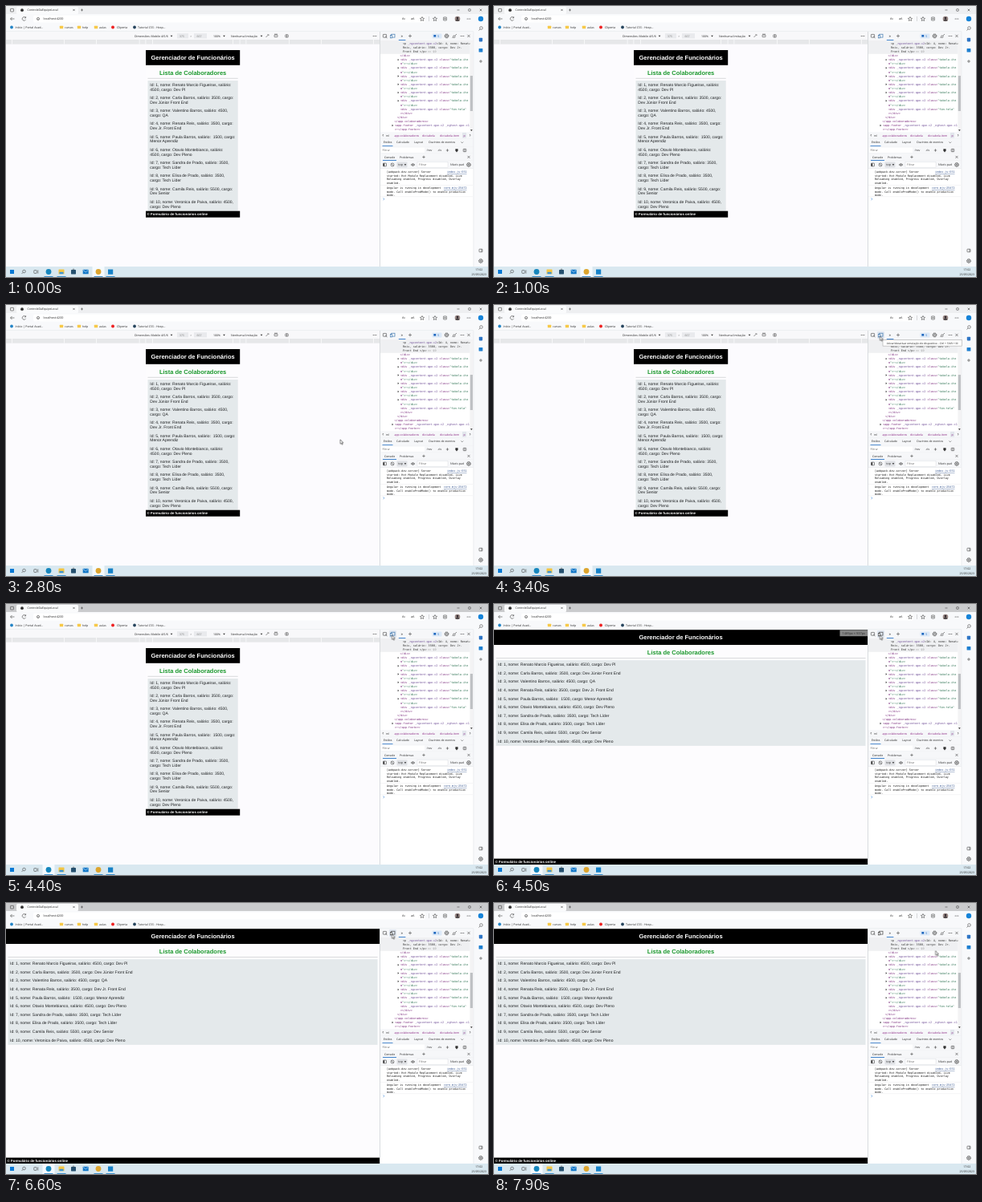
An HTML page for the animation above (8 s loop, 600x338 px).

```html
<!DOCTYPE html>
<html lang="pt-BR">
<head>
<meta charset="utf-8">
<title>Lista de Colaboradores</title>
<style>
html, body { margin: 0; width: 100%; height: 100%; overflow: hidden; background: #fff; }
svg { display: block; width: 100vw; height: 100vh; }
text { font-family: "Open Sans", "Noto Sans", sans-serif; text-rendering: geometricPrecision; white-space: pre; }
.page text { font-family: "Liberation Sans", Arial, sans-serif; }
.mono text { font-family: "DejaVu Sans Mono", "Liberation Mono", monospace; }
.attr { fill: #6c4a94; }
.val { fill: #2a7050; }
.b { font-weight: 700; }
.line { fill: none; stroke: #444; stroke-width: .6; }
.phone, .desk, .size, .tip, .blurred, .focused, .hover, .cursor { animation: 8s step-end infinite; }
.phone { animation-name: phone; }
.desk { animation-name: desk; }
.size { animation-name: size; }
.tip { animation-name: tip; }
.blurred { animation-name: blurred; }
.focused { animation-name: focused; }
.hover { animation-name: hover; }
.cursor { animation-name: cursor; }
@keyframes phone { 0% { opacity: 1; } 56.25%, 100% { opacity: 0; } }
@keyframes desk { 0% { opacity: 0; } 56.25%, 100% { opacity: 1; } }
@keyframes size { 0% { opacity: 0; } 56.25% { opacity: 1; } 65%, 100% { opacity: 0; } }
@keyframes tip { 0% { opacity: 0; } 42.5% { opacity: 1; } 53.75%, 100% { opacity: 0; } }
@keyframes blurred { 0% { opacity: 1; } 53.75%, 100% { opacity: 0; } }
@keyframes focused { 0% { opacity: 0; } 53.75%, 100% { opacity: 1; } }
@keyframes hover { 0% { opacity: 0; } 41.25% { opacity: 1; } 98.75%, 100% { opacity: 0; } }
@keyframes cursor {
  0% { opacity: 0; transform: translate(400px, 200px); }
  35% { opacity: 1; transform: translate(400px, 200px); animation-timing-function: steps(5, start); }
  41.25% { opacity: 1; transform: translate(480.4px, 38.8px); }
  98.75%, 100% { opacity: 1; transform: translate(549.6px, 59.6px); }
}
</style>
</head>
<body>
<svg id="stage" viewBox="0 0 600 338" preserveAspectRatio="none"></svg>
<script>
const esc = s => s.replace(/&/g, '&amp;').replace(/</g, '&lt;').replace(/>/g, '&gt;');
const rect = (x, y, w, h, fill, more = '') => `<rect x="${x}" y="${y}" width="${w}" height="${h}" fill="${fill}" ${more}/>`;
const dot = (x, y, r, fill, more = '') => `<circle cx="${x}" cy="${y}" r="${r}" fill="${fill}" ${more}/>`;
const path = (d, more = '') => `<path class="line" d="${d}" ${more}/>`;
const text = (x, y, s, size = 3.5, fill = '#222', more = '') =>
  `<text x="${x}" y="${y}" font-size="${size}" fill="${fill}" ${more}>${esc(s)}</text>`;
const mid = (x, y, s, size, fill, more = '') => text(x, y, s, size, fill, `text-anchor="middle" ${more}`);
const group = (name, ...parts) => `<g class="${name}">${parts.join('')}</g>`;

// Small interface icons
const ring = (x, y, r = 2) => dot(x, y, r, 'none', 'class="line"');
const gear = (x, y) => ring(x, y, 2.1) + ring(x, y, .8) +
  dot(x, y, 2.5, 'none', 'stroke="#444" stroke-width=".7" stroke-dasharray="1 .96"');
const cross = (x, y, r = 1.6) => path(`M${x - r} ${y - r}l${2 * r} ${2 * r}m0 ${-2 * r}l${-2 * r} ${2 * r}`);
const plus = (x, y, r = 2) => path(`M${x - r} ${y}h${2 * r}M${x} ${y - r}v${2 * r}`);
const caret = (x, y) => `<path d="M${x - 1.3} ${y - .7}h2.6l-1.3 1.8z" fill="#222"/>`;
const dots = (x, y) => [-1.8, 0, 1.8].map(d => dot(x + d, y, .5, '#333')).join('');
const box = (x, y, w, h) => rect(x - w / 2, y - h / 2, w, h, 'none', 'class="line" rx=".5"');
const lens = (x, y) => ring(x + .5, y - .5, 1.8) + path(`M${x - .8} ${y + .8}l-1.7 1.7`);
const eye = (x, y) => path(`M${x - 2.5} ${y}q2.5 -3 5 0q-2.5 3 -5 0`) + dot(x, y, .8, '#444');
const star = (x, y) => path(`M${x} ${y - 2.5}l.8 1.7 1.8.2-1.3 1.3.3 1.8-1.6-.9-1.6.9.3-1.8-1.3-1.3 1.8-.2z`);

function browser() {
  const folder = (x, label) => rect(x - 2.2, 24.7, 4.4, 3.6, '#f7c948', 'rx=".5"') + text(x + 4, 28.1, label, 3.5);
  return group('browser',
    rect(0, 0, 600, 10, '#eeeff1'), group('focused', rect(0, 0, 600, 10, '#cacbcd')),
    rect(13, 1, 77, 9, '#fafbfc', 'rx="1.5"'),
    box(7.5, 5.2, 4, 3.6), dot(20, 5.2, 1.9, '#333'),
    text(26.5, 6.4, 'ControleDaEquipeLocal', 3.5), cross(84.5, 5, 1.1), plus(94.5, 5, 1.5),
    path('M561.5 5h3'), box(577, 5, 2.6, 2.6), cross(591, 5, 1.3),
    rect(0, 10, 600, 22, '#f8f9fb'), rect(34, 11.8, 488, 8.6, '#fff', 'rx="2"'),
    path('M10.5 16h-5l2-2m-2 2l2 2'), path('M24.4 14.6a2.3 2.3 0 1 0 .2 2.3M24.6 13.2v1.7h-1.7'),
    ring(40, 16, 1.6), path('M40 15.7v1.3'), text(46.5, 17.3, 'localhost:4200', 3.7),
    text(493, 17.3, 'A»', 3.7), text(504, 17.3, 'aA', 3.7), star(518, 16), star(534, 16),
    box(546.5, 16, 4, 4), plus(546.5, 16, 1), path('M526.5 13v6', 'opacity=".3"'),
    dot(562, 16, 3.3, '#9b8a86'), dot(562, 15, 1.3, '#342b30'), path('M559.8 18.2q2.2-3.4 4.4 0z', 'style="fill:#342b30"'),
    dots(576, 16), dot(591, 16, 3.2, '#1683d8'),
    dot(7, 26.5, 1.9, '#2384c6'), text(11.5, 28.1, 'Início | Portal Acad...', 3.6),
    folder(69, 'cursos'), folder(91, 'help'), folder(112, 'aulas'),
    dot(133, 26.5, 2, '#e22'), text(138, 28.1, 'Cliperia', 3.7),
    dot(160, 26.5, 1.9, '#27455e'), text(164, 28.1, 'Tutorial CSS - Hosp...', 3.6),
    rect(0, 31.6, 582, .5, '#dde0e4'));
}

function sidebar() {
  return group('sidebar', rect(582, 22, 18, 303, '#f8f9fb'), rect(581.7, 32, .5, 293, '#dcdfe3'),
    lens(591, 28), rect(588.8, 39.8, 4.4, 4.6, '#2e75c5', 'rx=".8"'), rect(588.6, 53, 4.8, 4.4, '#1d7fd0', 'rx=".5"'),
    plus(591, 69), box(591, 305, 4, 3.6), path('M592 303.2v3.6'), gear(591, 318));
}

function taskbar() {
  const active = (name, x) => group(name, rect(x - 7.5, 325, 15, 13, '#f5fafe'));
  return group('taskbar', rect(0, 325, 600, 13, '#d9e8f0'),
    active('blurred', 115), active('focused', 53),
    rect(5, 329, 5, 5, '#0878d4'), lens(22, 331.5),
    box(36.5, 331.5, 3.4, 3.8), path('M39.8 329.4v4.2'),
    dot(53, 331.5, 3.4, '#1686bd'),
    rect(65.5, 328.6, 7, 5.6, '#f4c542', 'rx=".5"'), rect(66.5, 331.8, 5, 2.4, '#3b93d6'),
    rect(81, 329, 6, 5.4, '#25506f', 'rx=".6"'), path('M82.6 329q1.4-2.4 2.8 0'),
    rect(95.7, 328.8, 7, 5.4, '#1478c8', 'rx=".5"'), path('M95.9 329.2l3.3 2.8 3.3-2.8', 'style="stroke:#d7ebff"'),
    dot(115, 331.5, 3.4, '#dda52f'), rect(127, 328.5, 6.2, 6.2, '#1681c7'),
    [53, 69, 115, 130].map(x => rect(x - 5.5, 337.2, 11, .8, '#1a7bc4')).join(''),
    mid(588.8, 329.9, '17:02', 3.5, '#222'), mid(588.8, 335.9, '25/05/2023', 3.5, '#222'));
}

// name, salary, role, and the words that stay on the first phone line
const staff = [
  ['Renato Marcio Figueiras', ' 4500', 'Dev Pl', 'salário:'],
  ['Carla Barros', ' 3500', 'Dev Júnior Front End', 'cargo:'],
  ['Valentino Barros', ' 4500', 'QA', '4500,'],
  ['Renata Reis', ' 3500', 'Dev Jr. Front End', 'cargo:'],
  ['Paula Barros', '  1500', 'Menor Aprendiz', 'cargo:'],
  ['Otavio Montebianco', ' 4500', 'Dev Pleno', 'salário:'],
  ['Sandra de Prado', ' 3500', 'Tech Líder', '3500,'],
  ['Elisa de Prado', ' 3500', 'Tech Líder', '3500,'],
  ['Camila Reis', ' 5500', 'Dev Senior', 'cargo:'],
  ['Veronica de Paiva', ' 4500', 'Dev Pleno', '4500,']
].map(([name, pay, role, stop], i) => {
  const all = `Id: ${i + 1}, nome: ${name}, salário:${pay}, cargo: ${role}`;
  const cut = all.indexOf(stop) + stop.length;
  return { all, lines: [all.slice(0, cut), all.slice(cut).trim()] };
});

// Shared layout of the page: left edge, top, width, list height, footer top
function page(x, y, w, list, foot, items) {
  const c = x + w / 2;
  return group('page',
    rect(x, y, w, foot + 8 - y, '#fdfcfe'), rect(x, y, w, 18.8, '#000'),
    mid(c, y + 12.1, 'Gerenciador de Funcionários', 7.5, '#fff', 'class="b"'),
    mid(c, y + 30.8, 'Lista de Colaboradores', 7.5, '#1a982c', 'class="b"'),
    rect(x + 2.5, y + 34.9, w - 5, .5, '#b4b6b9'),
    rect(x + 2.5, y + 38, w - 5, list, '#e4e9eb'), items,
    rect(x, foot, w, 8, '#000'),
    text(x + 1.6, foot + 5.6, '© Formulário de funcionários online', 4.4, '#fff', 'class="b"'));
}

function phone() {
  const rows = staff.map(({ lines }, i) =>
    lines.map((s, k) => text(179.3, 99.8 + i * 16.22 + k * 5.75, s, 5, '#1d1f21')).join('')).join('');
  const marks = [320, 375, 425, 768, 1024, 1440].flatMap(v => [-1, 1].map(s => 232.5 + s * v * .15625));
  return group('phone', rect(0, 32, 465, 293, '#fcfbfe'), rect(0, 32, 465, 10, '#f8f8fa'),
    text(160, 38.7, 'Dimensões: Mobile 4/5/6', 3.6), caret(206, 37.4),
    rect(213, 34.2, 14, 6.2, '#e9eaed'), mid(219, 38.7, '375', 3.4, '#777'),
    mid(230.2, 38.7, '×', 3.4, '#777'), rect(234, 34.2, 16, 6.2, '#e9eaed'), mid(240.5, 38.7, '667', 3.4, '#777'),
    text(258, 38.7, '100%', 3.5), caret(271.5, 37.4),
    text(280, 38.7, 'Nenhuma limitação', 3.6), caret(318, 37.4),
    path('M323.5 39l3.5-3.5m-1.5-.5l2 2'), box(336, 37.4, 4, 2.5), path('M334 35.2h4'),
    box(349.5, 37.4, 3.5, 3.2), path('M349.5 35.8v3.2'), dots(459, 37.4),
    rect(0, 42, 465, 5.6, '#e6e7e9'), marks.map(x => rect(x - .4, 42, .8, 5.6, '#fbfbfc')).join(''),
    page(174, 55, 117.2, 162.5, 255.7, rows));
}

function desktop() {
  const rows = staff.map(({ all }, i) => text(5, 77.2 + i * 10.6, all, 5, '#1d1f21')).join('');
  return group('desk', rect(0, 32, 465, 293, '#fdfcfe'), page(0, 32.2, 465, 106.7, 317.6, rows)) +
    group('size', rect(430.5, 32.4, 34.5, 7.8, '#858585'), mid(447.8, 37.7, '1489px × 937px', 3.9, '#2d2d2d'));
}

function codeRow(x, row, s, fill = '#7a2a7c') {
  const body = esc(s)
    .replace(/"[^"]*"?/g, '<tspan class=val>$&</tspan>')
    .replace(/(_ng[\w-]+| class(?==&|="))/g, '<tspan class=attr>$1</tspan>')
    .replace(/<tspan class=(\w+)>/g, '<tspan class="$1">');
  return `<text x="${x}" y="${47.7 + row * 5.12}" font-size="3.5" fill="${fill}">${body}</text>`;
}

function elements() {
  const open = '<div _ngcontent-qpe-c2 class="';
  const arrow = (x, row) => { const y = 46.6 + row * 5.12; return `<path d="M${x} ${y - 1.2}l1.8 1.2-1.8 1.2z" fill="#444"/>`; };
  const divs = [4, 6, 8, 10, 12, 14].map(r =>
    arrow(487.6, r) + codeRow(491, r, open + 'tabela-ite') + codeRow(491, r + 1, 'm">⋯</div>')).join('');
  return group('mono', rect(466, 43.5, 111.5, 16.3, '#eff0f2'),
    codeRow(494, 0, '<p _ngcontent-qpe-c2>Id: 4, nome: Renata', '#333'),
    codeRow(494, 1, 'Reis, salário: 3500, cargo: Dev Jr.', '#333'),
    codeRow(494, 2, 'Front End </p>', '#333'), codeRow(525, 2, '== $0', '#999'),
    codeRow(490.5, 3, '</div>'), divs,
    codeRow(491, 16, open + 'fim-tela"'), codeRow(491, 17, '></div>'), codeRow(487, 18, '</div>'),
    codeRow(483.5, 19, '</app-colaboradores>'), arrow(480.5, 20),
    codeRow(484, 20, '<app-footer _ngcontent-qpe-c2 _nghost-qpe-c1'), codeRow(484, 21, '>⋯</app-footer>'));
}

function consoleLog() {
  const log = [[207, '[webpack-dev-server] Server'], [211.5, 'started: Hot Module Replacement disabled, Live'],
    [216, 'Reloading enabled, Progress disabled, Overlay'], [220.4, 'enabled.'],
    [227, 'Angular is running in development'], [231.5, 'mode. Call enableProdMode() to enable production'], [235.8, 'mode.']];
  const link = (y, s) => text(573.5, y, s, 3.4, '#284a88', 'text-anchor="end" text-decoration="underline"');
  return group('mono', log.map(([y, s]) => text(474, y + 1.1, s, 3.4, '#111')).join(''),
    link(208.1, 'index.js:551'), link(228.1, 'core.mjs:25472'),
    rect(466, 223, 115, .4, '#e5e5e8'), rect(466, 237.7, 115, .4, '#e5e5e8'),
    path('M469.6 239.6l1.3 1.2-1.3 1.2', 'style="stroke:#2878d0"'));
}

function devtools() {
  const bar = (y, h) => rect(466, y, 115.7, h, '#f6f7f9') + rect(466, y + h, 115.7, .4, '#d9dbdf');
  const device = color => `<g fill="none" stroke="${color}" stroke-width=".7">
    <rect x="479.7" y="35.2" width="4.3" height="3.9"/><rect x="478.5" y="36.6" width="2" height="3.3" fill="#fff"/></g>`;
  return group('tools', rect(465, 32, 117, 293, '#fff'), rect(465, 32, .8, 293, '#cfd2d6'),
    bar(32, 11), group('hover', rect(477, 33, 9, 9, '#dfe6f0', 'rx="1"')),
    box(471.5, 37.3, 4.2, 3.8), path('M472 37.6l2.5 2.4'),
    group('phone', device('#3f78b0')), group('desk', device('#444')),
    text(491.6, 38.9, '»', 5), rect(488.8, 42.1, 8.6, .8, '#1769c4'), plus(503, 37.4),
    rect(530.5, 34.4, 12, 6, '#dce9f8', 'rx="1"'), rect(532.4, 36, 2.8, 2.6, '#1b65bd'), text(537.2, 38.8, '5', 3.6, '#1b65bd'),
    gear(548.5, 37.4), ring(557.8, 38.2, 1.3), path('M559 37l2-2m-4.5 4l-1 1'), dots(568, 37.4), cross(576, 37.4),
    elements(),
    rect(577.4, 43.5, 4, 114, '#f3f3f4'), rect(577.8, 87, 3.2, 44, '#bfc1c4'),
    caret(579.4, 155),
    bar(157.3, 7.8), path('M470 160l-1.3 1.2 1.3 1.2M577 160l1.3 1.2-1.3 1.2'),
    text(473, 162.5, 'ml', 3.4), text(483.5, 162.5, 'app-colaboradores', 3.5, '#882080'),
    text(518, 162.5, 'div.tabela', 3.5, '#882080'), text(540, 162.5, 'div.tabela-item', 3.5, '#882080'),
    rect(568, 158, 5, 6.5, '#e2e6ec'), text(569.5, 162.5, 'p', 3.5, '#882080'),
    bar(165.6, 9.4), text(470, 171.3, 'Estilos', 3.5, '#111'), rect(468.5, 174.3, 13, .8, '#1769c4'),
    text(486, 171.3, 'Calculado', 3.5), text(508, 171.3, 'Layout', 3.5),
    text(526, 171.3, 'Ouvintes de eventos', 3.5), path('M566.5 169.5l1.3 1.3 1.3-1.3'),
    bar(175.5, 8.4), rect(467, 176.6, 54, 6.3, '#fff'), text(468.5, 181.4, 'Filtrar', 3.5, '#666'),
    text(523.5, 181.4, ':hov', 3.5), text(537, 181.4, '.cls', 3.5), plus(549.5, 180, 1.7),
    `<path d="M559.4 178.2h3.2v2.4l-1.6 2-1.6-2z" fill="#333"/>`, box(571, 180, 3.6, 3.4), path('M571 178.3v3.4'),
    bar(184, 8.8), text(471, 189.8, 'Console', 3.5, '#111'), rect(469, 192, 17, .8, '#1769c4'),
    text(490, 189.8, 'Problemas', 3.5), plus(520, 188.4, 1.7), cross(576, 188.4, 1.5),
    bar(193.2, 9.4), box(471.5, 198, 4, 3.8), rect(469.7, 196.3, 1.5, 3.5, '#333'),
    ring(481, 198), path('M479.6 196.6l2.8 2.8'), rect(486.5, 194.4, 13, 7.2, '#dfe1e5', 'rx="1"'),
    text(488.3, 199.3, 'top', 3.5), caret(497, 198), eye(506.5, 198),
    rect(512, 194.6, 38, 6.8, '#fff', 'stroke="#d4d7dc" stroke-width=".4"'), text(514, 199.3, 'Filtrar', 3.5, '#666'),
    text(553, 199.3, 'Níveis pad', 3.5), gear(576, 198), consoleLog());
}

const tooltip = group('tip', rect(484, 43.7, 98.5, 7.4, '#fff', 'stroke="#999" stroke-width=".5"'),
  mid(533.2, 48.6, 'Ativar/desativar emulação de dispositivo - Ctrl + Shift + M', 3.35, '#222'));
const cursor = group('cursor',
  '<path d="M0 0v5.4l1.3-1.1.9 2 .9-.4-.9-1.9h1.7z" fill="#fff" stroke="#111" stroke-width=".5"/>');

document.getElementById('stage').innerHTML =
  browser() + phone() + desktop() + devtools() + sidebar() + taskbar() + tooltip + cursor;
</script>
</body>
</html>
```
